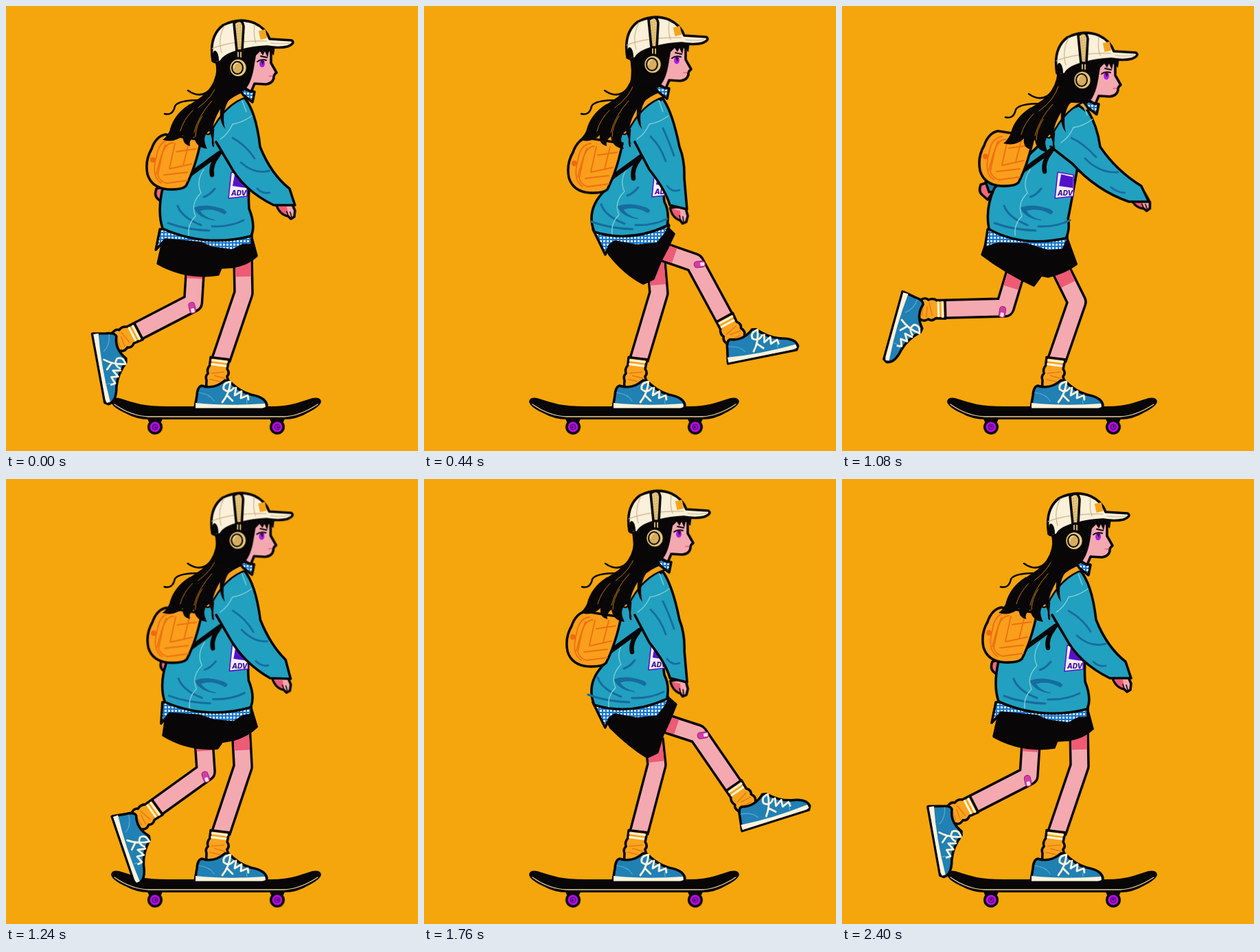
Write an HTML page without scripts that moves like this. It is 600 px wide and 648 px high and loops after 2.44 s.

```html
<!DOCTYPE html>
<html lang="en">
<head>
<meta charset="utf-8">
<title>Skater</title>
<style>
html, body { margin: 0; height: 100%; overflow: hidden; background: #f5a60c; }
svg { display: block; width: 100%; height: 100%; stroke-linejoin: round; stroke-linecap: round; }
.ink { stroke: #080606; stroke-width: 3.6; }
.line { fill: none; }

/* Two 1200 ms pushes and a 40 ms rest */
.move { animation: 2.44s linear infinite; }
.head { animation-name: head; }
.hair { animation-name: hair; }
.bag { animation-name: bag; }
.far { animation-name: far; }
.hand { animation-name: hand; }
.folds { animation-name: folds; }
.torso { animation-name: torso; }
.arm { animation-name: arm; }
.crease { animation-name: crease; }
.shirt { animation-name: shirt; }
.shorts { animation-name: shorts; }
.stand { animation-name: stand; }
.kick { animation-name: kick; }
.wheel { animation: spin .305s linear infinite; }

.leg { fill: none; stroke-linecap: butt; }
.edge { stroke: #080606; stroke-width: 29.5; }
.skin { stroke: #f4a9b1; stroke-width: 22.5; }
.shade { stroke: #ed5b74; stroke-width: 22.5; stroke-dasharray: 42 999; }
.stand.shade { stroke-dasharray: 34 999; }

@keyframes spin { to { transform: rotate(360deg); } }
@keyframes head {
  0%, 49.18%, 98.36%, to { transform: translate(0, 0); }
  9.84%, 59.02% { transform: translate(-4px, -4px); }
  18.03%, 67.21% { transform: translate(-5px, -5px); }
  22.95%, 72.13% { transform: translate(-2px, -4px); }
  31.15%, 80.33% { transform: translate(9px, 14px); }
  36.07%, 85.25% { transform: translate(13px, 20px); }
  44.26%, 93.44% { transform: translate(12px, 18px); }
}
@keyframes hair {
  0%, 49.18%, 98.36%, to { transform: translate(0, 0); }
  9.84%, 59.02%, 18.03%, 67.21% { transform: translate(-2px, 0); }
  22.95%, 72.13% { transform: translate(-1px, 0); }
  36.07%, 85.25%, 44.26%, 93.44% { transform: translate(7px, 5px); }
}
@keyframes bag {
  0%, 49.18%, 98.36%, to { transform: translate(0, 0); }
  9.84%, 59.02% { transform: translate(7px, 3px); }
  18.03%, 67.21% { transform: translate(5px, 5px); }
  22.95%, 72.13% { transform: translate(3px, 6px); }
  36.07%, 85.25% { transform: translate(-9px, -7px); }
  44.26%, 93.44% { transform: translate(-5px, -5px); }
}
@keyframes far {
  0%, 49.18%, 98.36%, to { transform: translate(0, 0); }
  9.84%, 59.02%, 22.95%, 72.13% { transform: translate(45px, -14px); }
  36.07%, 85.25%, 44.26%, 93.44% { transform: translate(-17px, -6px); }
}
@keyframes hand {
  0%, 49.18%, 98.36%, to { transform: translate(409px, 300px); }
  9.84%, 59.02%, 22.95%, 72.13% { transform: translate(372px, 306px) rotate(8deg); }
  36.07%, 85.25%, 44.26%, 93.44% { transform: translate(437px, 289px) rotate(-6deg); }
}
@keyframes folds {
  0%, 49.18%, 98.36%, to { transform: translate(0, 0); }
  9.84%, 59.02%, 18.03%, 67.21% { transform: translate(8px, -2px); }
  22.95%, 72.13% { transform: translate(3px, -2px); }
  36.07%, 85.25% { transform: translate(-18px, 0); }
  44.26%, 93.44% { transform: translate(-14px, 0); }
}
@keyframes torso {
  0%, 49.18%, 98.36%, to { d: path("M335 128Q295 150 286 190L228 265Q220 300 228 324Q290 352 357 335Q364 320 354 295Q352 265 357 235L352 140Z"); }
  9.84%, 59.02%, 22.95%, 72.13% { d: path("M333 128Q295 150 286 190L264 268Q235 296 248 329Q300 345 354 320Q358 300 350 285Q346 260 350 230L350 140Z"); }
  36.07%, 85.25% { d: path("M345 145Q302 160 288 200L218 262Q198 300 204 322Q252 346 322 338Q330 325 327 305Q332 280 340 240L358 155Z"); }
  44.26%, 93.44% { d: path("M345 145Q302 160 290 200L222 265Q208 295 214 325Q262 352 326 338Q332 325 329 310Q334 285 342 240L358 155Z"); }
}
@keyframes arm {
  0%, 49.18%, 98.36%, to { d: path("M346 132Q364 152 370 205Q386 245 413 266L421 290L390 290Q345 268 325 230L306 198"); }
  9.84%, 59.02%, 22.95%, 72.13% { d: path("M348 135Q362 155 372 205Q380 225 379 250L383 296L358 290Q352 268 328 238L307 198"); }
  36.07%, 85.25%, 44.26%, 93.44% { d: path("M358 152Q372 175 376 205Q400 240 436 262L447 285L418 285Q370 268 336 230L304 205"); }
}
@keyframes crease {
  0%, 49.18%, 98.36%, to { d: path("M330 192Q350 203 362 222M342 228Q362 246 384 240M366 266Q374 274 384 272"); }
  9.84%, 59.02%, 22.95%, 72.13% { d: path("M330 190Q345 205 352 226M348 178Q358 200 364 218M354 262Q362 272 372 268"); }
  36.07%, 85.25%, 44.26%, 93.44% { d: path("M334 192Q352 200 370 220M354 222Q376 244 402 242M392 264Q402 272 412 272"); }
}
@keyframes shirt {
  0%, 49.18%, 98.36%, to { d: path("M224 325L218 355L232 340L283 345L300 352L330 356L345 348L358 348L358 325Z"); }
  9.84%, 59.02%, 22.95%, 72.13% { d: path("M246 325L264 362L270 349L278 343L310 349L340 346L352 331L357 320L350 308Z"); }
  36.07%, 85.25% { d: path("M204 318L202 354L218 346L262 346L290 356L318 354L322 346L324 342L323 320Z"); }
  44.26%, 93.44% { d: path("M212 325L208 352L228 346L268 347L300 357L322 355L326 345L328 342L327 320Z"); }
}
@keyframes shorts {
  0%, 49.18%, 98.36%, to { d: path("M230 335L221 375Q262 398 309 391L313 381L330 380Q352 376 365 364L356 330Z"); }
  9.84%, 59.02% { d: path("M258 335L268 365Q284 384 304 396L322 390L335 378Q353 362 366 345L352 320Z"); }
  18.03%, 67.21% { d: path("M255 330L270 362Q292 390 319 404L334 397L344 372Q355 352 364 332L350 318Z"); }
  22.95%, 72.13% { d: path("M258 335L272 362Q300 390 325 405L340 398L348 372Q358 352 367 328L352 315Z"); }
  36.07%, 85.25% { d: path("M205 340L191 378Q232 400 272 417L284 408L292 398Q312 395 329 380L320 345Z"); }
  44.26%, 93.44% { d: path("M212 338L204 362Q238 388 279 407L290 392L300 394Q325 388 341 376L328 340Z"); }
}
@keyframes stand {
  0%, 49.18%, 98.36%, to { d: path("M345 360L346 418L313 515"); }
  9.84%, 59.02% { d: path("M328 365L341 424L313 515"); }
  18.03%, 67.21% { d: path("M338 372L342 418L313 515"); }
  22.95%, 72.13% { d: path("M335 378L339 416L313 515"); }
  36.07%, 85.25% { d: path("M303 378L337 434L313 515"); }
  44.26%, 93.44% { d: path("M314 375L342 431L313 515"); }
}
@keyframes kick {
  0%, 49.18%, 98.36%, to { d: path("M277 355L272 432L192 473"); }
  4.92%, 54.1% { d: path("M304 352L328 415L274 486"); }
  9.84%, 59.02% { d: path("M322 345L382 388L372 472"); }
  18.03%, 67.21% { d: path("M325 350L394 374L437 454"); }
  20.9%, 70.08% { d: path("M327 348L400 368L457 441"); }
  22.95%, 72.13% { d: path("M328 348L399 371L451 446"); }
  26.23%, 75.41% { d: path("M314 357L388 400L425 490"); }
  28.69%, 77.87% { d: path("M300 366L340 466L352 558"); }
  31.15%, 80.33% { d: path("M282 374L304 464L264 546"); }
  33.61%, 82.79% { d: path("M264 380L262 456L197 519"); }
  36.07%, 85.25% { d: path("M245 385L230 446L149 488"); }
  40.16%, 89.34% { d: path("M250 378L222 440L135 452"); }
  44.26%, 93.44% { d: path("M258 370L237 439L150 441"); }
}
</style>
</head>
<body>
<svg viewBox="0 0 600 648">
  <defs>
    <pattern id="check" width="5" height="5" patternUnits="userSpaceOnUse">
      <path d="M0 0H5V5H0Z" fill="#1676cf"/>
      <path d="M1 1H4V4H1Z" fill="#dcecf8"/>
    </pattern>

    <g id="sock">
      <path class="ink" fill="#f9a41d" d="M0-14L14-13Q20-18 25-14Q32-18 36-14L46-14V14L34 15Q28 18 24 14Q18 17 12 13L0 13Z"/>
      <path class="line" stroke="#fdf3d8" stroke-width="3.2" d="M4-11V10M10-10V10"/>
      <path class="line" stroke="#ee7812" stroke-width="1.6" d="M19-9L23 9M28-11L26 4M34-8L32 10"/>
    </g>

    <!-- Origin at the bottom of the heel -->
    <g id="shoe">
      <path class="ink" fill="#2180b4" d="M2-2L5-20Q6-33 12-34Q30-28 46-42L52-41Q66-26 84-21Q106-17 107-5L104 0L2 0Z"/>
      <path fill="#fdf3dc" d="M3-9Q50-4 104-8L105-3L100-1.5L3-1.5Z"/>
      <path class="line" stroke="#58acd0" stroke-width="1.2" d="M8-24Q24-22 30-12M82-18Q76-14 78-8"/>
      <path class="line" stroke="#fdf3dc" stroke-width="2.8" d="M42-10Q52-22 54-40Q42-38 44-29Q52-22 59-31M49-20L57-12M62-31L60-20L70-26L69-16L79-20L80-14"/>
    </g>

    <g id="truck">
      <path fill="#080606" d="M-12-14H12L8-5H-8Z"/>
      <g class="wheel">
        <circle class="ink" r="9.2" fill="#bd0df0"/>
        <circle r="4" fill="#9a0cc8" stroke="#47105c" stroke-width="1.2"/>
        <circle cx="1" r="1.2" fill="#2a0838"/>
      </g>
    </g>

    <marker id="plaster" orient="auto" markerUnits="userSpaceOnUse" markerWidth="1" markerHeight="1" overflow="visible">
      <g transform="translate(7 -3) rotate(-45)">
        <rect x="-8" y="-4.5" width="16" height="9" rx="4" fill="#d43ca6" stroke="#9c1f70"/>
        <rect x="1" y="-2.5" width="6" height="5" rx="1" fill="#fbe3ee"/>
      </g>
    </marker>
    <marker id="foot" orient="auto" markerUnits="userSpaceOnUse" markerWidth="1" markerHeight="1" overflow="visible">
      <use href="#sock"/>
      <use href="#shoe" transform="translate(61 29) rotate(-73)"/>
    </marker>
  </defs>

  <rect width="600" height="648" fill="#f5a60c"/>

  <!-- Board -->
  <use href="#truck" transform="translate(217 613)"/>
  <use href="#truck" transform="translate(395 613)"/>
  <path fill="#080606" d="M153 576Q154 569 165 571Q180 576 196 580Q212 583 235 583H385Q408 583 424 578L446 571Q458 569 459 576Q458 583 440 592Q424 602 405 602H208Q190 602 174 593Q154 584 153 576Z"/>
  <path class="line" stroke="#e9cf9c" stroke-width="1.3" d="M158 580Q182 597 208 598H405Q428 597 454 580"/>

  <!-- Standing leg -->
  <path class="move stand leg edge" d="M345 360L346 418L313 515"/>
  <path class="move stand leg skin" d="M345 360L346 418L313 515"/>
  <path class="move stand leg shade" d="M345 360L346 418L313 515"/>
  <use href="#sock" transform="translate(311 513) rotate(97)"/>
  <use href="#shoe" transform="translate(273 587)"/>

  <!-- Pushing leg -->
  <path class="move kick leg edge" d="M277 355L272 432L192 473"/>
  <path class="move kick leg skin" d="M277 355L272 432L192 473"/>
  <path class="move kick leg shade" d="M277 355L272 432L192 473"/>
  <path class="move kick leg" d="M277 355L272 432L192 473" marker-mid="url(#plaster)" marker-end="url(#foot)"/>

  <path class="move shorts ink" fill="#080606" stroke-width="2" d="M230 335L221 375Q262 398 309 391L313 381L330 380Q352 376 365 364L356 330Z"/>
  <path class="move shirt ink" fill="url(#check)" d="M224 325L218 355L232 340L283 345L300 352L330 356L345 348L358 348L358 325Z"/>

  <g class="move far ink">
    <path fill="#ed6b80" d="M219 266Q215 276 221 281L229 288L238 275L232 262Z"/>
    <path fill="#1d7ba6" d="M226 262L250 258L243 276L231 277Z"/>
  </g>

  <!-- Sweater -->
  <path class="move torso ink" fill="#22a0bf" d="M335 128Q295 150 286 190L228 265Q220 300 228 324Q290 352 357 335Q364 320 354 295Q352 265 357 235L352 140Z"/>
  <g class="move folds">
    <g class="line" stroke="#176c9e" stroke-width="3">
      <path d="M250 291Q256 308 284 319M236 316Q262 326 296 327M300 321Q326 322 346 312M304 266Q296 276 288 278"/>
      <path fill="#176c9e" stroke-width="1" d="M274 294Q290 287 316 296Q324 300 318 303Q300 292 282 298Q288 308 304 312Q280 309 274 294Z"/>
    </g>
    <path class="line" stroke="#7fd0da" stroke-width="1.3" d="M288 238Q276 256 284 272Q268 288 276 306Q264 318 266 334"/>
    <path fill="#f5edff" stroke="#5a12c4" stroke-width="1.6" d="M328 242L351 246V277L324 280Z"/>
    <path fill="#5312c8" d="M333 245L350 249V265L330 262Z"/>
    <text x="328" y="276" font-family="Inter, Arial, sans-serif" font-size="10" font-weight="800" font-style="italic" fill="#3c1090">ADV</text>
  </g>

  <!-- Backpack -->
  <g class="move bag">
    <path class="line" stroke="#080606" stroke-width="6.5" d="M260 251L311 214M309 217Q297 232 300 246"/>
    <path class="ink" fill="#fa9f1b" d="M232 187Q218 190 212 208Q202 225 206 245Q212 265 236 267Q256 268 262 262Q276 235 284 195Z"/>
    <path class="line" stroke="#ee7010" stroke-width="1.8" d="M238 195Q222 197 219 220Q211 248 226 258M243 199Q230 200 226 222L221 246Q224 256 234 258L264 254M232 202Q224 222 219 244M246 200L238 236M238 237L270 230M248 212L276 208M230 246L264 242M266 200L258 232"/>
    <circle cx="214" cy="224" r="4" fill="#ee6a10"/>
  </g>

  <!-- Near arm -->
  <g class="move hand">
    <path class="ink" fill="#f4a9b1" d="M-15-10Q-10 4 2 6L6 10L11 7L12-2L6-16Z"/>
    <path fill="#ed5b74" d="M-13-9Q-8 3 2 4L0-8Z"/>
    <path class="line" stroke="#080606" stroke-width="1.6" d="M2 5L0-1M7 7L5 0"/>
  </g>
  <path class="move arm ink" fill="#22a0bf" d="M346 132Q364 152 370 205Q386 245 413 266L421 290L390 290Q345 268 325 230L306 198"/>
  <path class="move crease line" stroke="#176c9e" stroke-width="2.8" d="M330 192Q350 203 362 222M342 228Q362 246 384 240M366 266Q374 274 384 272"/>

  <!-- Long hair and shoulder strap -->
  <g class="move hair">
    <path class="line" stroke="#7fd0da" stroke-width="1.4" d="M312 194Q324 186 330 172Q344 170 358 160M344 138L350 154"/>
    <path class="line" stroke="#080606" stroke-width="12" d="M350 128Q316 138 294 182"/>
    <path class="line" stroke="#f9a21b" stroke-width="7" d="M350 128Q316 138 294 182"/>
    <path fill="#080606" d="M305 72Q314 115 276 138Q248 155 240 178Q235 190 228 195Q246 200 258 188Q256 201 268 204Q266 196 274 190Q276 206 293 208Q284 190 296 182Q302 200 304 202Q294 180 312 150Q310 168 319 179Q312 150 330 130Q342 132 346 112L350 60Z"/>
    <path class="line" stroke="#080606" stroke-width="2.6" d="M302 116Q286 138 265 123M284 137Q250 137 246 146Q243 160 231 157M268 144Q246 158 240 180M302 180Q300 200 302 204"/>
    <path class="line" stroke="#b87612" stroke-width="1" d="M308 112Q302 132 280 148M272 152Q258 166 254 182M300 138Q280 160 274 184M286 160Q276 176 276 190"/>
  </g>

  <!-- Head -->
  <g class="move head">
    <path class="ink" fill="url(#check)" d="M338 119L362 125L359 140L346 130Z"/>
    <path class="ink" fill="#f4a9b1" d="M358 64H386L386 83L394 97Q389 101 390 105Q388 113 378 114L362 113L357 125L347 119L350 90Z"/>
    <path fill="#080606" d="M303 74Q310 100 304 122L346 124Q357 114 361 90L364 72L370 66L374 72L377 66L381 75L383 66L390 72L392 58L320 60Z"/>
    <path class="line" stroke="#ed5b74" stroke-width="1.5" d="M383 102L388 102"/>
    <ellipse cx="373" cy="84" rx="4" ry="5.2" fill="#b018e8"/>
    <path fill="#280838" d="M371 80H376L374 86Z"/>
    <path class="line" stroke="#080606" stroke-width="2" d="M366 81Q371 77 379 79M371 73L380 75"/>
    <path class="ink" fill="#fbf0d9" d="M301 80Q295 44 316 28Q340 16 362 25Q378 32 384 48L416 50Q422 54 410 59Q398 62 380 59Q360 60 345 64Q318 70 313 81Q305 84 301 80Z"/>
    <path fill="#080606" d="M302 81Q299 65 305 65Q310 68 310 80Z"/>
    <path class="line" stroke="#cdb68b" stroke-width="1.2" d="M300 62Q330 50 380 51M318 29Q308 48 314 68M362 27Q360 44 364 54M386 54Q400 56 413 54"/>
    <rect x="-5" y="-6" width="10" height="13" fill="#f5a51b" transform="translate(374 41) rotate(-12)"/>
    <path class="line" stroke="#080606" stroke-width="8" d="M340 64V78"/>
    <path class="line" stroke="#e6c67c" stroke-width="1.8" d="M338 66V76M342 66V76"/>
    <path class="ink" stroke-width="3" fill="#e7c67d" d="M332 25Q344 16 346 30L344 65H336Z"/>
    <path class="line" stroke="#b99650" stroke-dasharray="1 3" d="M337 28L339 62M341 27V62"/>
    <ellipse class="ink" cx="338" cy="90" rx="13.5" ry="14" fill="#e7c67d"/>
    <ellipse cx="337" cy="90" rx="8" ry="9" fill="#d6ad5c" stroke="#080606" stroke-width="2"/>
    <path class="line" stroke="#f3deaa" stroke-width="1.4" d="M332 90Q332 84 337 83"/>
  </g>
</svg>
</body>
</html>
```
